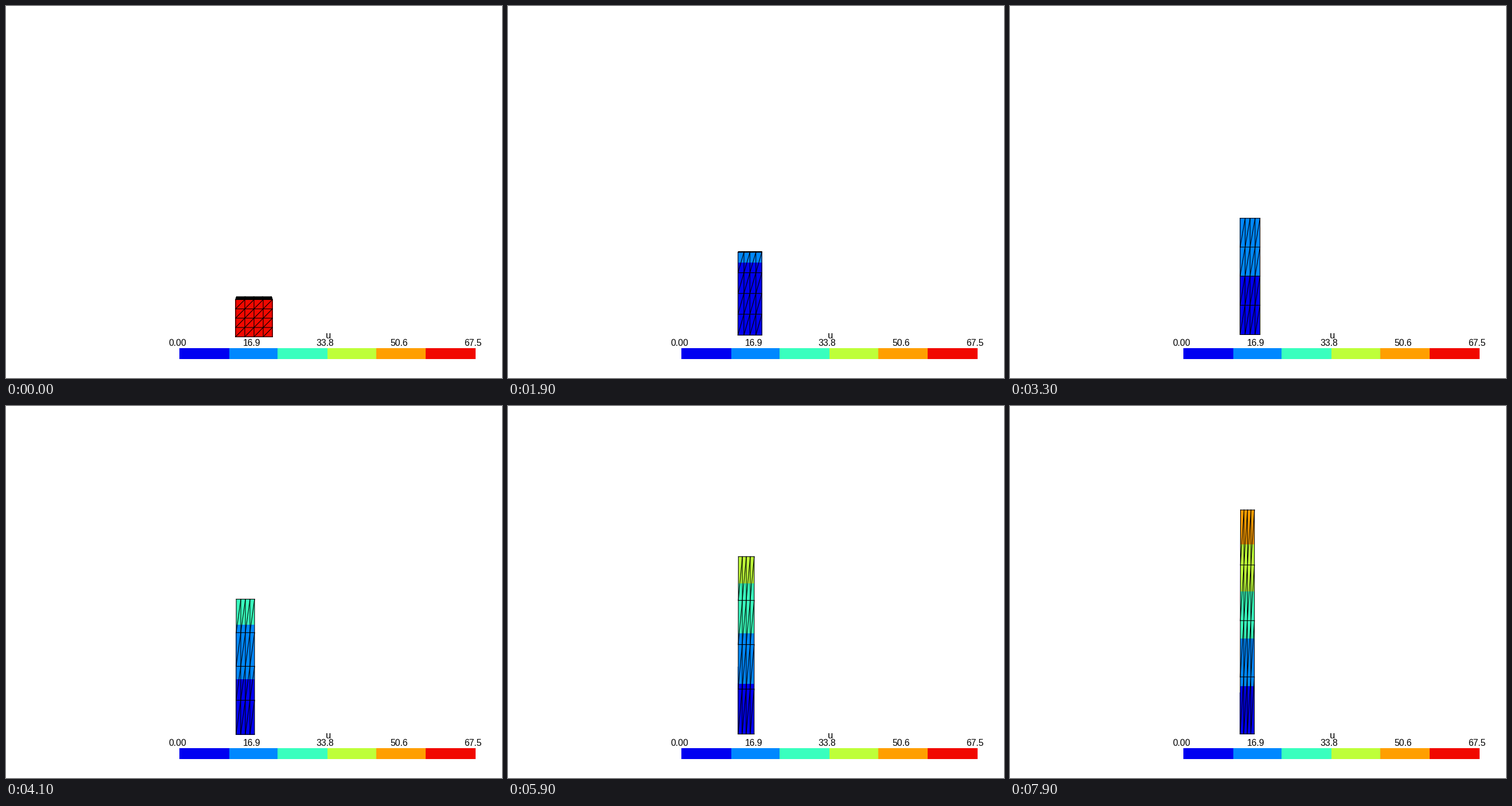
A matplotlib script for the animation above (8000 ms loop, 864 by 648 pixels).

```python
import numpy as np
import matplotlib.pyplot as plt
from matplotlib.animation import FuncAnimation
from matplotlib.collections import LineCollection, PolyCollection
from matplotlib.patches import Rectangle

W, H, DPI = 864, 648, 100
FRAMES, INTERVAL = 80, 100

SIDE, CELLS = 10.0, 4
U_MAX, BANDS, RATE = 67.5, 6, 0.675

# Pinhole camera in front of the block, tilted slightly upwards
FOCAL = H / 2 / np.tan(np.radians(15))
TILT = np.radians(4.07)
CAM_X, CAM_Z, CAM_DIST = 5.0, 25.8, 190.5

COLORS = plt.get_cmap("jet")(np.linspace(0.1, 0.9, BANDS))


def px(n):
    """Pixels to points."""
    return n * 72 / DPI


def project(p):
    """World points (x, depth, z) to stage pixels."""
    x, y, z = np.moveaxis(np.asarray(p, float), -1, 0)
    fwd, up = CAM_DIST + y, z - CAM_Z
    depth = fwd * np.cos(TILT) + up * np.sin(TILT)
    rise = up * np.cos(TILT) - fwd * np.sin(TILT)
    return np.stack([W / 2 + FOCAL * (x - CAM_X) / depth,
                     H / 2 - FOCAL * rise / depth], axis=-1)


def face_lines():
    """Grid and diagonal segments of a face in unit coordinates."""
    t = np.linspace(0, 1, CELLS + 1)
    lines = [[(a, 0), (a, 1)] for a in t] + [[(0, a), (1, a)] for a in t]
    lines += [[(a, 0), (1, 1 - a)] for a in t[:-1]]
    lines += [[(0, a), (1 - a, 1)] for a in t[1:-1]]
    return np.array(lines)


MESH = face_lines()

fig = plt.figure(figsize=(W / DPI, H / DPI), dpi=DPI, facecolor="white")
ax = fig.add_axes([0, 0, 1, 1])
ax.set_xlim(0, W)
ax.set_ylim(H, 0)
ax.axis("off")

# Scalar bar
edges = [302, 389, 473, 560, 645, 731, 818]
for left, right, color in zip(edges, edges[1:], COLORS):
    ax.add_patch(Rectangle((left, 596), right - left, 19, color=color, lw=0))


def label(x, y, s, size):
    ax.text(x, y, s, family="Liberation Sans", fontsize=px(size),
            ha="center", va="baseline", color="black")


for x, s in zip((298.5, 427.8, 556, 685, 813),
                ("0.00", "16.9", "33.8", "50.6", "67.5")):
    label(x, 591.5, s, 15.8)
label(561.5, 578.7, "u", 16.5)

fill = PolyCollection([], linewidths=0, antialiaseds=False, zorder=2)
wire = LineCollection([], colors="black", linewidths=px(1.1), zorder=3,
                      capstyle="projecting")
wire.set_snap(False)
ax.add_collection(fill, autolim=False)
ax.add_collection(wire, autolim=False)


def draw(i):
    u = RATE * i
    top = SIDE + u
    width = SIDE / np.sqrt(top / SIDE)
    front = SIDE - width

    def on_front(uv):
        a, b = uv[..., 0], uv[..., 1]
        return project(np.stack([a * width, 0 * a + front, b * top], -1))

    def on_top(uv):
        a, b = uv[..., 0], uv[..., 1]
        return project(np.stack([a * width, front + b * width,
                                 0 * a + top], -1))

    def rect(lo, hi):
        return np.array([(0, lo), (1, lo), (1, hi), (0, hi)])

    polys, colors = [], []
    step = U_MAX / BANDS
    for k in range(BANDS):
        lo = k * step / u if u else 0
        if lo >= 1:
            break
        hi = min((k + 1) * step / u, 1) if u else 1
        polys.append(on_front(rect(lo, hi)))
        colors.append(COLORS[k])
    lines = list(on_front(MESH))

    if top < CAM_Z:
        polys.append(on_top(rect(0, 1)))
        shade = colors[-1].copy()
        shade[:3] *= 0.2
        colors.append(shade)
        lines += list(on_top(MESH))

    fill.set_verts(polys)
    fill.set_facecolor(colors)
    wire.set_segments(lines)
    return fill, wire


anim = FuncAnimation(fig, draw, frames=FRAMES, interval=INTERVAL,
                     repeat=True, repeat_delay=0, blit=False)
plt.show()
```
